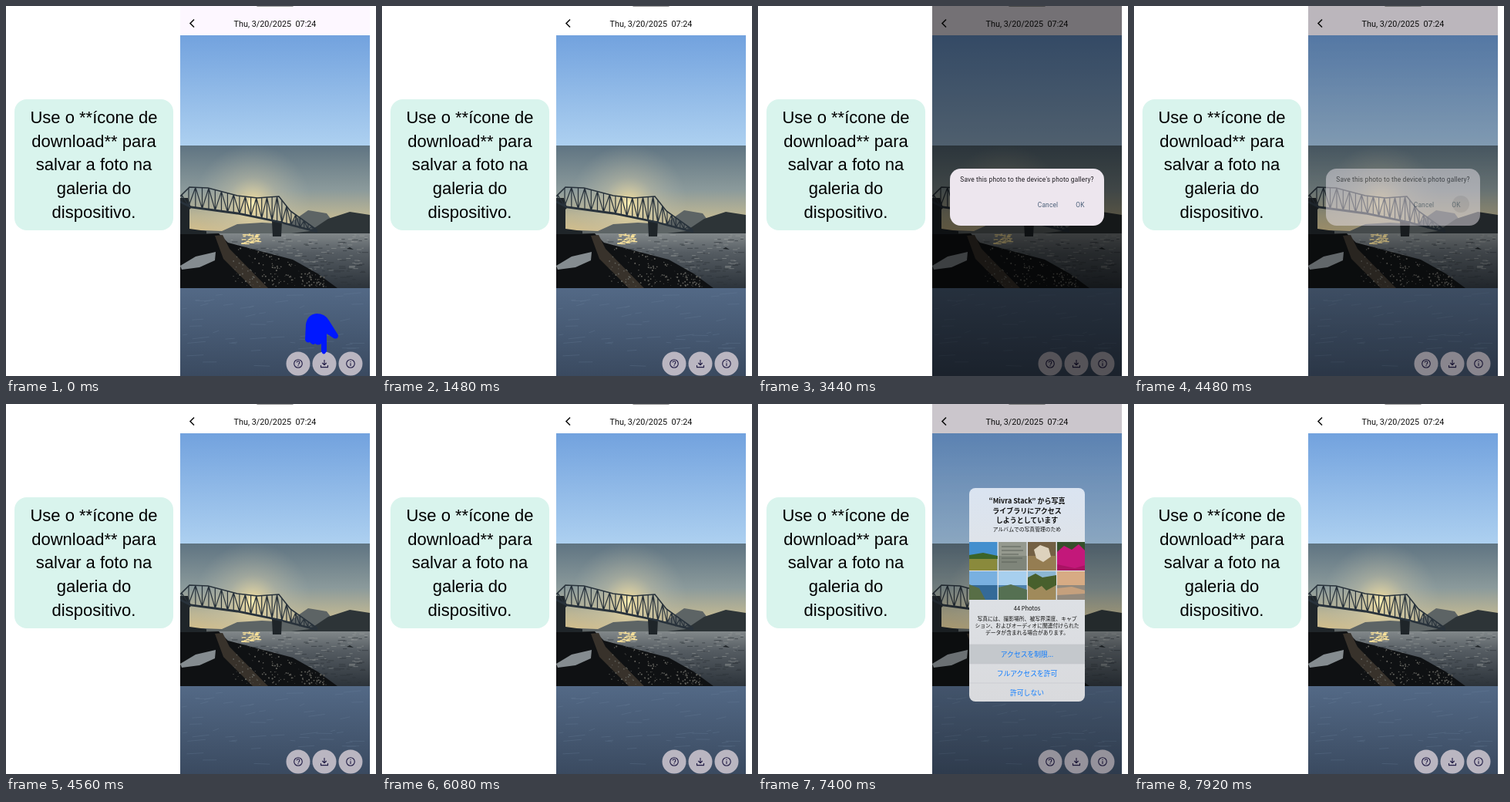
These frames come from a looping animation (480 by 480 pixels, 8000 ms). An HTML page:

```html
<!DOCTYPE html>
<html lang="pt">
<head>
<meta charset="utf-8">
<style>
html, body { margin: 0; width: 100%; height: 100%; overflow: hidden; background: #fff; }
svg { display: block; width: 100vw; height: 100vh; }
text { text-anchor: middle; font-family: Roboto, sans-serif; }
#note text { font: 22px "Liberation Sans", Arial, sans-serif; }
#alert text { font-family: "Noto Sans CJK JP", "Noto Sans CJK", sans-serif; }
#ask text { font-size: 8.4px; letter-spacing: .15px; }
.icon { fill: none; stroke: #211c45; stroke-width: 1.1; }
</style>
</head>
<body>
<svg viewBox="0 0 480 480">
  <defs>
    <linearGradient id="sky" x2="0" y2="1"><stop stop-color="#72a2de"/><stop offset="1" stop-color="#add0f0"/></linearGradient>
    <linearGradient id="dusk" x2="0" y2="1"><stop stop-color="#5f7482"/><stop offset=".5" stop-color="#8b9a9b"/><stop offset=".8" stop-color="#bdb694"/><stop offset="1" stop-color="#d6bf8a"/></linearGradient>
    <linearGradient id="sea" x2="0" y2="1"><stop stop-color="#82888a"/><stop offset=".35" stop-color="#555c62"/><stop offset="1" stop-color="#2c333a"/></linearGradient>
    <linearGradient id="deep" x2="0" y2="1"><stop stop-color="#536986"/><stop offset="1" stop-color="#3a4a60"/></linearGradient>
    <linearGradient id="glass" x2="0" y2="1"><stop stop-color="#dae4f1"/><stop offset=".3" stop-color="#dfe3e8"/><stop offset="1" stop-color="#d9dadd"/></linearGradient>
    <radialGradient id="glow"><stop stop-color="#fff3b8"/><stop offset=".12" stop-color="#f3dfa2" stop-opacity=".75"/><stop offset=".45" stop-color="#cfc8a8" stop-opacity=".4"/><stop offset="1" stop-color="#b5b8ab" stop-opacity="0"/></radialGradient>
    <clipPath id="phone"><path d="M226 0h246v480H226z"/></clipPath>
    <clipPath id="view"><path d="M226 181h246v185H226z"/></clipPath>
    <clipPath id="card"><rect x="274" y="109" width="150" height="277" rx="8"/></clipPath>
  </defs>

  <g id="note"><rect x="11" y="121" width="206" height="170" rx="16" fill="#d9f4ed"/></g>

  <g clip-path="url(#phone)">
    <path id="header" d="M226 0h246v38H226z"/>
    <rect x="325" y="-2" width="48" height="3" rx="1.5" fill="#999"/>
    <path d="M226 38h246v143H226z" fill="url(#sky)"/>
    <path d="M226 366h246v114H226z" fill="url(#deep)"/>
    <g id="ripples" fill="none" stroke="#7288a4" stroke-width=".7" opacity=".35"/>

    <g clip-path="url(#view)">
      <path d="M226 181h246v115H226z" fill="url(#dusk)"/>
      <circle cx="320" cy="256" r="76" fill="url(#glow)"/>
      <path d="M226 292l30-1 24 1 20-9 32-2 34 2 26-18 24 4 20 27H226z" fill="#5d6465"/>
      <path d="M362 296l32-4 24-16 28-9 26 4v25z" fill="#2d3437"/>
      <path d="M226 295h246v71H226z" fill="url(#sea)"/>
      <g id="waves" fill="none" stroke="#adb0ad" stroke-width=".8" opacity=".5"/>
      <g id="troughs" fill="none" stroke="#2c3237" opacity=".6"/>
      <g id="sparkle" fill="none" stroke="#fbe39b" stroke-width="1.3"/>
      <path d="M226 296l50-1 12 12 42 11 42 11 32 18 26 19H226z" fill="#0f1113"/>
      <path d="M226 337l20-12 26-6-1 11-20 9-23 3z" fill="#858c90"/>
      <path d="M271 298l10-1 9 18 50 51h-20l-38-38z" fill="#38322b"/>
      <g id="rocks" fill="#62625d"/>
      <path d="M226 249h10l4 13-2 2v25l22 3v4h-34zM345 279h13l-1 20h-11z" fill="#1f2529"/>
      <g id="bridge" fill="none" stroke="#28323b"/>
      <path d="M442 315l4-2 5 3z" fill="#1d2226"/>
    </g>

    <path d="M244 17.5l-5 5 5 5" fill="none" stroke="#111" stroke-width="1.6"/>
    <text x="349" y="26.5" font-size="10.8" fill="#111">Thu, 3/20/2025&#160; 07:24</text>

    <g fill="#bab6c1"><circle cx="379" cy="464" r="15.5"/><circle cx="413" cy="464" r="15.5"/><circle cx="447" cy="464" r="15.5"/></g>
    <g class="icon">
      <circle cx="379" cy="464" r="5.3"/><path d="M377.2 462.6q0-1.8 1.8-1.8t1.8 1.7-1.8 2.6M379 466v1.2"/>
      <path d="M413 459v6.5m-2.7-2.5l2.7 2.7 2.7-2.7M408.5 466v2.6h9V466"/>
      <circle cx="447" cy="464" r="5.3"/><path d="M447 463.3v3.7m0-6v1.1"/>
    </g>

    <path id="hand" fill="#0018ff" d="M409 448Q412 455 416 448L416 425 425 431Q431 433 431 427L419 408Q414 399 403 399 391 400 389 413L388 433Q390 438 394 436 398 441 401 438 405 441 409 438Z"/>

    <path id="scrim" d="M226 0h246v480H226z"/>

    <g id="ask" fill="#1d1b20">
      <rect x="249" y="211" width="200" height="74" rx="14" fill="#ede6ee"/>
      <circle id="press" cx="424" cy="257" r="11" opacity=".12"/>
      <text x="349" y="228">Save this photo to the device's photo gallery?</text>
      <g fill="#4b6079"><text x="376" y="261">Cancel</text><text x="418" y="261">OK</text></g>
    </g>

    <g id="alert">
      <g clip-path="url(#card)">
        <path d="M274 109h150v277H274z" fill="url(#glass)"/>
        <path id="row" d="M274 312h150v25H274z" fill="#c4c8cc"/>
        <path d="M274 312h150M274 337h150M274 362h150" stroke="#c3c5c9" stroke-width=".6"/>
        <g id="thumbs"/>
      </g>
    </g>
  </g>
</svg>
<script>
const $ = id => document.getElementById(id);
const add = (id, markup) => $(id).insertAdjacentHTML('beforeend', markup);
const fade = (id, v) => $(id).setAttribute('opacity', v);
const clamp = v => Math.max(0, Math.min(1, v));
const span = (t, a, b) => clamp((t - a) / (b - a));
const easeOut = p => 1 - (1 - p) ** 2;

let seed = 7;
const rnd = (a, b) => (seed = seed * 16807 % 2147483647, a + (b - a) * seed / 2147483647);

function scatter(id, n, item) {
  let out = '';
  for (let i = 0; i < n; i++) out += item();
  add(id, out);
}

['Use o **ícone de', 'download** para', 'salvar a foto na', 'galeria do', 'dispositivo.'].forEach((s, i) =>
  add('note', `<text x="114" y="${152 + i * 30.7}">${s}</text>`));

// Truss between two chords
const topChord = [[226, 247], [238, 235], [262, 236], [300, 246], [326, 249], [354, 247], [369, 266], [404, 291]];
const lowChord = [[226, 254], [240, 261], [300, 269], [354, 280], [404, 293]];
function heightAt(chord, x) {
  const i = Math.max(1, chord.findIndex(p => p[0] >= x));
  const [[x0, y0], [x1, y1]] = [chord[i - 1], chord[i]];
  return y0 + (y1 - y0) * (x - x0) / (x1 - x0);
}
let truss = '';
for (let i = 0, x = 228; x < 398; i++) {
  const next = x + 9 - i * .17;
  const a = heightAt(topChord, x), b = heightAt(lowChord, x);
  truss += `M${x} ${a}V${b}`;
  truss += i % 2 ? `L${next} ${heightAt(topChord, next)}` : `M${x} ${a}L${next} ${heightAt(lowChord, next)}`;
  x = next;
}
add('bridge', `<path d="${truss}" stroke-width="1.2"/><path d="M${topChord.join('L')}" stroke-width="1.6"/><path d="M${lowChord.join('L')}" stroke-width="2.8"/>`);

scatter('waves', 110, () => `<path d="M${rnd(285, 466)} ${rnd(297, 345)}h${rnd(2, 8)}"/>`);
scatter('troughs', 110, () => `<path d="M${rnd(285, 466)} ${rnd(300, 364)}h${rnd(3, 10)}"/>`);
scatter('sparkle', 36, () => `<path d="M${rnd(305, 326)} ${rnd(296, 309)}h${rnd(2, 6)}"/>`);
scatter('ripples', 50, () => `<path d="M${rnd(226, 455)} ${rnd(372, 470)}l${rnd(6, 24)} ${rnd(-3, 1)}"/>`);
scatter('rocks', 150, () => {
  const x = rnd(295, 415);
  return `<circle cx="${x}" cy="${rnd(314 + Math.max(0, x - 320) * .4, 364)}" r="${rnd(.4, 1.1)}"/>`;
});

// Thumbnails: upper colour, lower colour, detail shape and its colour
[
  ['#438fce', '#8a8a3c', 'M0 17l18-3 19 4v4H0z', '#3c6428'],
  ['#95998e', '#7f857a', 'M4 6h25M4 11h28M4 16h22M4 21h27M4 26h20', '#5d625b'],
  ['#736044', '#957d52', 'M8 10l8-6 11 4 3 11-10 7-9-5z', '#ddd2bd'],
  ['#35502b', '#a91363', 'M0 13l9-8 10 5 9-7 9 9v18l-14 4-23-5z', '#c3187a'],
  ['#79b0e0', '#346a98', 'M0 17l13 5 8 15H0z', '#586e46'],
  ['#a7cfee', '#4e82ad', 'M0 21l16-4 21 7v13H0z', '#557052'],
  ['#8cb6d2', '#a08a5b', 'M0 8l10-5 9 5 18-3v13l-13 7-6-6-9 5-9-6z', '#485f2c'],
  ['#d7ab84', '#92897d', 'M0 22l19-2 18 5v4L0 31z', '#c5a07d']
].forEach(([up, low, d, ink], i) => {
  const x = 274 + i % 4 * 38, y = 179 + (i >> 2) * 38;
  const paint = i === 1 ? `stroke="${ink}"` : `fill="${ink}"`;
  add('thumbs', `<g transform="translate(${x} ${y})"><path d="M0 0h36.5v37H0z" fill="${up}"/><path d="M0 18h36.5v19H0z" fill="${low}"/><path d="${d}" ${paint}/></g>`);
});

const label = (s, y, size, weight = 400, fill = '#111') =>
  add('alert', `<text x="349" y="${y + size * .38}" font-size="${size}" font-weight="${weight}" fill="${fill}">${s}</text>`);
label('“Mivra Stack” から写真', 126, 9, 700);
label('ライブラリにアクセス', 138.3, 9, 700);
label('しようとしています', 150.6, 9, 700);
label('アルバムでの写真管理のため', 162.5, 6.8);
label('44 Photos', 265.5, 7.5, 500);
label('写真には、撮影場所、被写界深度、キャプ', 278, 6.8);
label('ション、およびオーディオに関連付けられた', 287.3, 6.8);
label('データが含まれる場合があります。', 296.5, 6.8);
['アクセスを制限...', 'フルアクセスを許可', '許可しない'].forEach((s, i) =>
  label(s, 324.5 + i * 25, 8.8, 400, '#0a7aff'));

function draw(t) {
  const pulse = 1 + .17 * Math.sin(Math.PI * span(t, 480, 1320)) ** 2;
  $('hand').setAttribute('transform', `translate(409 420) scale(${pulse}) translate(-409 -420)`);
  fade('hand', 1 - span(t, 1320, 1480));

  const ask = t < 4280 ? easeOut(span(t, 3000, 3320)) : 1 - span(t, 4280, 4560) ** 2;
  fade('ask', ask);
  fade('press', t >= 4320 ? .12 : 0);

  const shown = easeOut(span(t, 6080, 6480));
  const alert = t < 7480 ? shown : (1 - span(t, 7480, 7920)) ** 2;
  const zoom = 1.15 - .15 * shown;
  $('alert').setAttribute('transform', `translate(349 247.5) scale(${zoom}) translate(-349 -247.5)`);
  fade('alert', alert);
  fade('row', t >= 7400 ? 1 : 0);

  fade('scrim', .54 * ask + .2 * alert);
  $('header').setAttribute('fill', t < 1480 || ask + alert > 0 ? '#fdf7ff' : '#fff');
}

function loop(now) {
  draw(Math.floor(now % 8000 / 40) * 40);
  requestAnimationFrame(loop);
}
draw(0);
requestAnimationFrame(loop);
</script>
</body>
</html>
```
